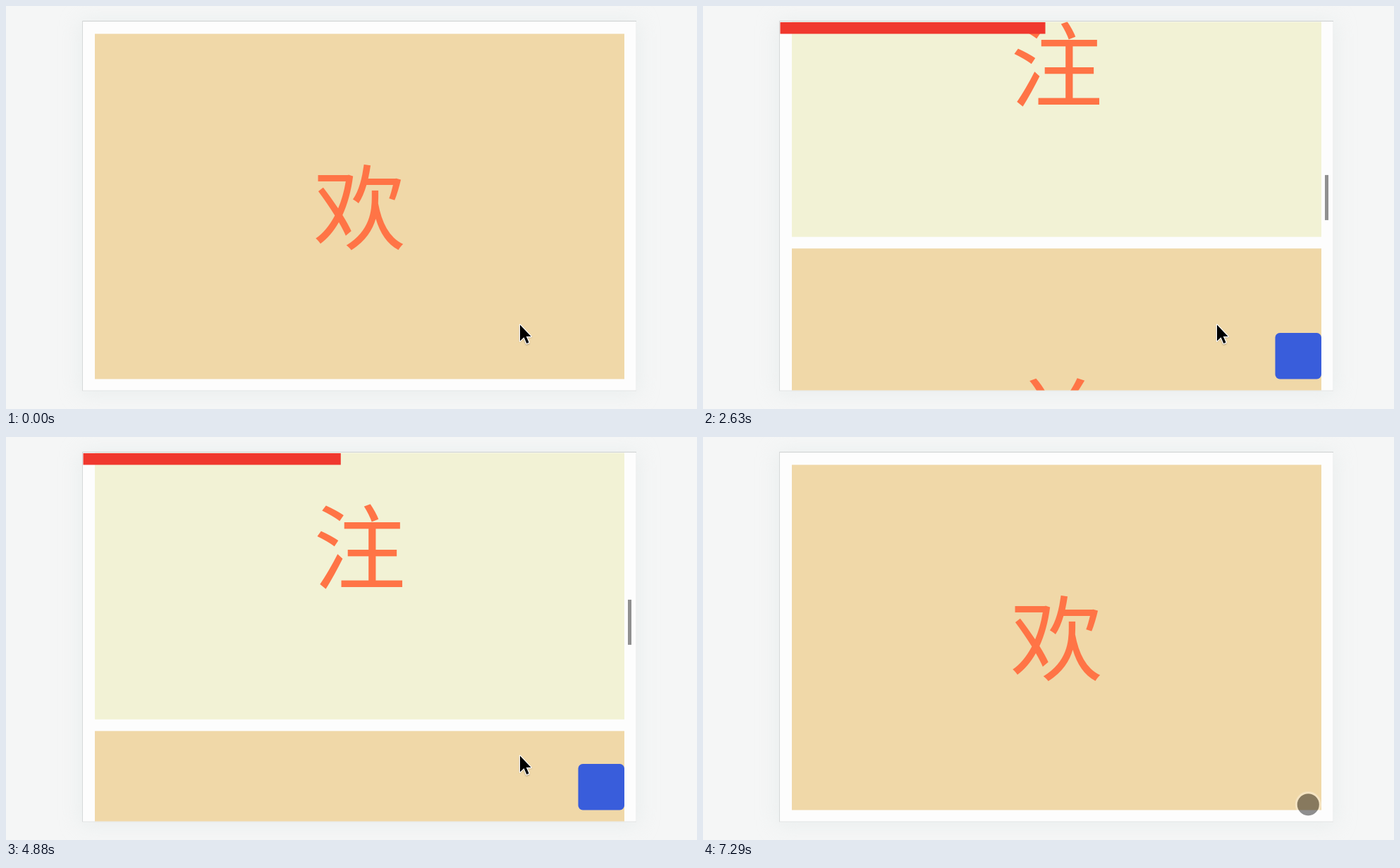
Recreate the animation shown at these times as an HTML page. Size 980x572 px, loop 7.33 s.

```html
<!DOCTYPE html>
<html lang="zh-CN">
<head>
<meta charset="utf-8">
<title>Scroll progress</title>
<style>
  html, body { margin: 0; width: 100%; height: 100%; overflow: hidden; background: #f5f6f6; }
  svg { display: block; width: 980px; height: 572px; }
  text { font: 400 131px "Noto Sans CJK SC", "Noto Sans CJK", sans-serif; fill: #ff7446; text-anchor: middle; }
</style>
</head>
<body>
<svg viewBox="0 0 980 572">
  <defs>
    <clipPath id="view"><rect x="109" y="22.5" width="784.5" height="523"/></clipPath>
    <filter id="blur" x="-20%" y="-20%" width="140%" height="140%"><feGaussianBlur stdDeviation="14"/></filter>
    <filter id="soft" x="-50%" y="-50%" width="200%" height="200%"><feGaussianBlur stdDeviation="1"/></filter>
  </defs>
  <rect width="980" height="572" fill="#f5f6f6"/>
  <rect x="104" y="20" width="794" height="532" fill="#dfe6e6" opacity=".5" filter="url(#blur)"/>
  <rect x="108" y="21" width="786" height="525.5" fill="#e3e6e6"/>
  <rect x="108" y="21" width="786" height="1" fill="#cdd0d0"/>
  <rect x="108" y="21" width="1" height="525" fill="#d6d9d9"/>
  <rect x="109" y="22" width="784.5" height="523.5" fill="#fdfdfd"/>
  <g clip-path="url(#view)">
    <g id="page"></g>
    <rect id="bar" x="109.5" y="23" height="16.5" fill="#f0382e"/>
    <rect id="button" x="811.5" y="464" width="65.5" height="65.5" rx="6.5" fill="#395ddb"/>
    <rect id="thumb" x="882" width="5" height="64" fill="#000"/>
  </g>
  <g id="arrow">
    <path d="M0 0V24L5.5 19L9.5 28.5L14 26.5L10.2 17.6H17.6Z" transform="translate(.5 2)" opacity=".3" filter="url(#soft)"/>
    <path d="M1 1.5V24.5L6.6 19.2L10.4 28L13.6 26.6L9.8 18H16.6Z" fill="#000" stroke="#fff" stroke-width="2.4" stroke-linejoin="round" paint-order="stroke"/>
  </g>
  <g id="touch">
    <circle r="15.6" fill="#000" fill-opacity=".44"/>
    <circle id="ring" r="17" fill="none" stroke="#fff" stroke-width="3"/>
  </g>
</svg>
<script>
const LOOP = 7330, STEP = 506.5, MAX = 3545, TAU = 360;
const $ = id => document.getElementById(id);
const set = (id, attrs) => {
  for (const key in attrs) $(id).setAttribute(key, attrs[key]);
};
const clamp = x => Math.max(0, Math.min(1, x));
const lerp = (a, b, u) => a + (b - a) * u;

// Segments of scrolling: start, end, from, to, kind, end speed in px/s
const moves = [
  [960, 1580, 0, 345, 'pull', 1600],
  [1580, 2080, 345, 790, 'glide'],
  [2250, 2630, 790, 1719, 'pull', 2300],
  [2630, 4080, 1719, 2537.5, 'glide'],
  [4290, 4880, 2537.5, 1648.5, 'pull', -350],
  [4880, 5420, 1648.5, 1552, 'glide'],
  [5920, 6580, 1552, 0, 'smooth']
];

const ease = {
  // Hermite curve from rest to the given speed
  pull(u, span, dist, speed) {
    const m = speed * span / 1000 / dist;
    return u * u * (3 - 2 * u) + m * u * u * (u - 1);
  },
  glide(u, span) {
    return (1 - Math.exp(-u * span / TAU)) / (1 - Math.exp(-span / TAU));
  },
  smooth(u) {
    return u * u * (3 - 2 * u);
  }
};

function scrollAt(t) {
  let pos = 0;
  for (const [start, end, from, to, kind, speed] of moves) {
    if (t < start) break;
    const span = end - start, u = clamp((t - start) / span);
    pos = lerp(from, to, ease[kind](u, span, to - from, speed));
  }
  return pos;
}

function thumbAlpha(t) {
  if (t < 960) return 0;
  if (t < 5920) return 1 - clamp((t - 5720) / 240);
  return 1 - clamp((t - 6800) / 200);
}

function buildPage() {
  const chars = [...'欢迎关注前端'];
  let html = '';
  for (let i = 0; i < 8; i++) {
    const y = 39.5 + i * STEP;
    html += `<rect x="126" y="${y}" width="751" height="490" fill="${i % 2 ? '#f2f2d5' : '#f0d8a8'}"/>`;
    html += `<text x="501.5" y="${y + 295}">${chars[i] || ''}</text>`;
  }
  $('page').innerHTML = html;
}

function draw(t) {
  const pos = scrollAt(t);
  set('page', { transform: `translate(0 ${-pos})` });
  // The progress bar trails the page slightly
  set('bar', { width: scrollAt(t - 9) / MAX * 784 });
  set('button', { visibility: pos > 200 ? 'visible' : 'hidden' });
  set('thumb', { y: 28.7 + pos * 0.1227, opacity: 0.43 * thumbAlpha(t) });

  const go = ease.smooth(clamp((t - 5580) / 280));
  const drift = clamp((t - 5880) / 400);
  const x = lerp(728, 854, go) + 4.3 * drift;
  const y = lerp(451, 519.5, go) + 2.3 * drift;
  const over = x > 812;
  set('arrow', { transform: `translate(${x} ${y})`, visibility: over ? 'hidden' : 'visible' });
  set('touch', { transform: `translate(${x} ${y})`, visibility: over ? 'visible' : 'hidden' });
  set('ring', { opacity: t < 7290 ? 0.42 : 0.3 });
}

buildPage();
const began = performance.now();
function tick() {
  draw((performance.now() - began) % LOOP);
  requestAnimationFrame(tick);
}
tick();
</script>
</body>
</html>
```
